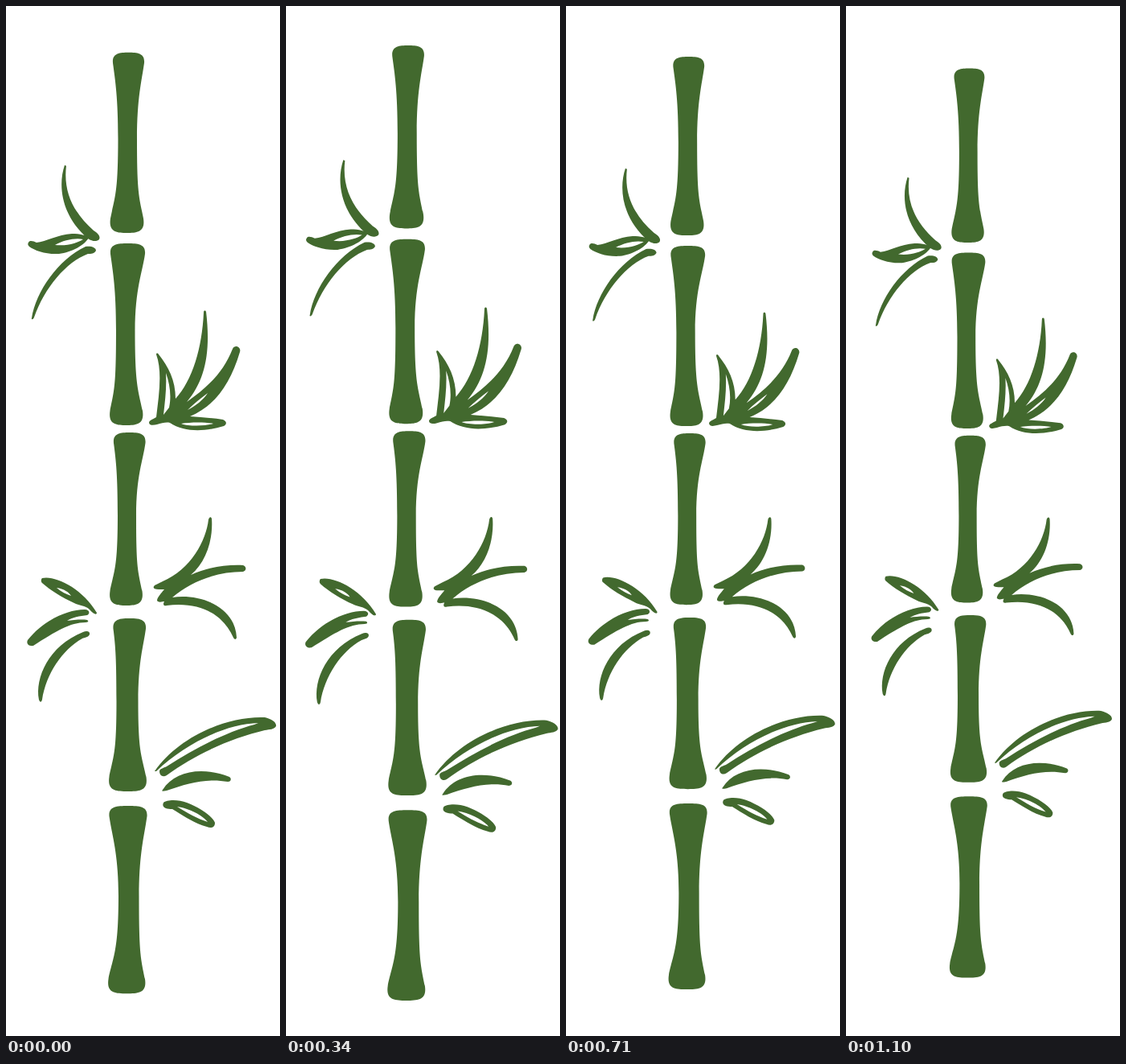
These frames come from a looping animation (341 by 1280 pixels, 1.13 s). An HTML page:

```html
<!DOCTYPE html>
<html lang="en">
<head>
<meta charset="utf-8">
<title>Bamboo</title>
<style>
html, body { margin: 0; width: 100%; height: 100%; overflow: hidden; background: #fff; }
svg { display: block; width: 100%; height: 100%; }
</style>
</head>
<body>
<svg viewBox="0 0 341 1280">
<g id="plant" fill="#42692e" fill-rule="evenodd">
  <path id="stalk"/>
  <!-- upper left leaves -->
  <path d="M73 198C64 225 70 262 102 289C108 293 113 293 116 290C118 286 114 282 109 279C85 258 71 232 75 199Z"/>
  <path d="M28 294C29 291 34 292 38 294C50 293 64 284 82 283C92 283 101 285 103 288C98 297 82 306 66 308C50 309 36 304 29 299C27 297 27 295 28 294Z
    M61 297C72 291 86 288 96 290C90 294 76 299 61 297Z"/>
  <path d="M32 388C37 355 65 315 99 299C106 298 112 300 112 304C110 308 106 308 102 308C75 318 48 350 35 387C34 390 31 390 32 388Z"/>
  <!-- upper right leaves -->
  <path d="M187 433C195 455 190 485 187 511C182 514 178 515 178 518C179 522 184 521 188 520C194 518 200 517 204 518C222 530 248 529 271 522C275 520 275 516 270 514C256 512 242 511 229 510C260 497 279 470 291 430C293 424 285 420 282 426C270 457 248 476 225 492C248 465 255 430 249 380C248 378 246 378 246 381C244 425 232 465 211 488C211 465 202 448 190 433C189 431 187 431 187 433Z
    M199 456C204 470 206 485 203 499L196 508C198 490 200 475 199 456Z
    M226 502C236 497 246 489 251 481C243 487 234 494 226 502Z
    M218 519C230 517 248 517 258 519C250 522 228 523 218 519Z"/>
  <!-- middle right leaves -->
  <path d="M252 638C249 665 230 700 195 715L185 720C182 723 184 725 190 725L197 725C193 730 188 735 188 739C190 742 195 740 197 740C195 743 196 746 200 745C240 740 270 755 283 785C284 787 286 788 287 785C285 745 240 730 207 735C230 715 262 703 295 703C299 702 300 697 295 695C272 694 250 698 230 707C248 692 258 665 256 637C255 634 253 635 252 638Z"/>
  <!-- middle left leaves -->
  <path d="M45 711C60 707 95 723 113 754C113 757 109 756 104 750C99 745 90 745 85 742C70 735 55 726 45 717C43 715 44 712 45 711Z
    M63 723C72 724 79 729 81 733C75 731 69 728 63 723Z"/>
  <path d="M27 788C45 765 75 750 98 750C104 750 105 755 101 757C92 758 82 760 76 764C84 763 94 762 101 763C103 764 103 766 99 766C80 766 62 777 34 795C28 796 25 792 27 788Z"/>
  <path d="M96 778C100 776 105 777 104 781C103 784 98 785 95 786C70 800 50 830 45 862C44 866 42 865 41 862C36 835 53 795 96 778Z"/>
  <!-- lower right leaves -->
  <path d="M185 951C215 908 275 882 322 884C330 886 337 890 336 895C334 899 328 899 322 900C280 910 235 930 200 956C195 959 191 956 191 951C191 948 196 947 200 945C235 922 275 902 309 893L314 891C275 892 225 915 187 951Z"/>
  <path d="M195 974C210 950 245 945 278 958C281 960 280 964 276 964C250 959 225 966 200 975C195 976 193 976 195 974Z"/>
  <path d="M196 990C200 986 215 986 225 990C243 997 258 1008 260 1015C260 1021 255 1022 250 1020C235 1016 220 1006 207 998C200 998 193 996 196 990Z
    M213 995C228 997 245 1006 251 1014C238 1010 226 1003 213 995Z"/>
</g>
</svg>
<script>
// top y, bottom y, then left and right x at the top, waist and foot
const segments = [
  [58, 282, 133, 172, 139.5, 163, 129.5, 171.5],
  [295, 521, 130, 173, 137, 160.5, 129, 170.5],
  [530, 745, 134, 173.5, 139, 162, 129, 170],
  [761, 976, 133.5, 174, 137.5, 164.5, 128, 175],
  [994, 1227, 128.5, 175.5, 140, 165.5, 127, 173.5]
];

function segment([y0, y1, tl, tr, ml, mr, bl, br]) {
  const h = y1 - y0, ym = y0 + h * .48, top = (tl + tr) / 2, foot = (bl + br) / 2;
  return `M${tl} ${y0 + 13}C${tl - 1} ${y0 + 1} ${tl + 8} ${y0} ${top} ${y0}
    C${tr - 8} ${y0} ${tr + 1} ${y0 + 1} ${tr} ${y0 + 13}
    C${tr - 3} ${y0 + 35} ${mr} ${y0 + h * .25} ${mr} ${ym}
    C${mr} ${ym + h * .3} ${br - 6} ${y1 - 45} ${br - .5} ${y1 - 18}
    C${br + 2} ${y1 - 1} ${br - 8} ${y1} ${foot} ${y1}
    C${bl + 8} ${y1} ${bl - 2} ${y1 - 1} ${bl + .5} ${y1 - 18}
    C${bl + 6} ${y1 - 45} ${ml} ${ym + h * .3} ${ml} ${ym}
    C${ml} ${y0 + h * .25} ${tl + 3} ${y0 + 35} ${tl} ${y0 + 13}Z`;
}
document.getElementById('stalk').setAttribute('d', segments.map(segment).join(''));

const plant = document.getElementById('plant');
const loop = 1130, cx = 181.3, cy = 642.5;
const holds = [...'545444444545554454534344443'].map(n => n * 10);

function stepStart(t) {
  let start = 0;
  for (const hold of holds) {
    if (t < start + hold) break;
    start += hold;
  }
  return start;
}

const ease = u => u < .5 ? 2 * u * u : 1 - 2 * (1 - u) ** 2;

// Largest at 310 ms, smallest at 1098 ms, then a hard restart.
function draw(now) {
  const t = stepStart(now % loop);
  const u = Math.min(1, Math.abs(t - 310) / 788);
  const top = 49 + 28.5 * ease(u);
  const s = (cy - top) / (cy - 58);
  plant.setAttribute('transform', `translate(${cx} ${cy}) scale(${s}) translate(${-cx} ${-cy})`);
  requestAnimationFrame(() => draw(performance.now()));
}
draw(performance.now());
</script>
</body>
</html>
```
